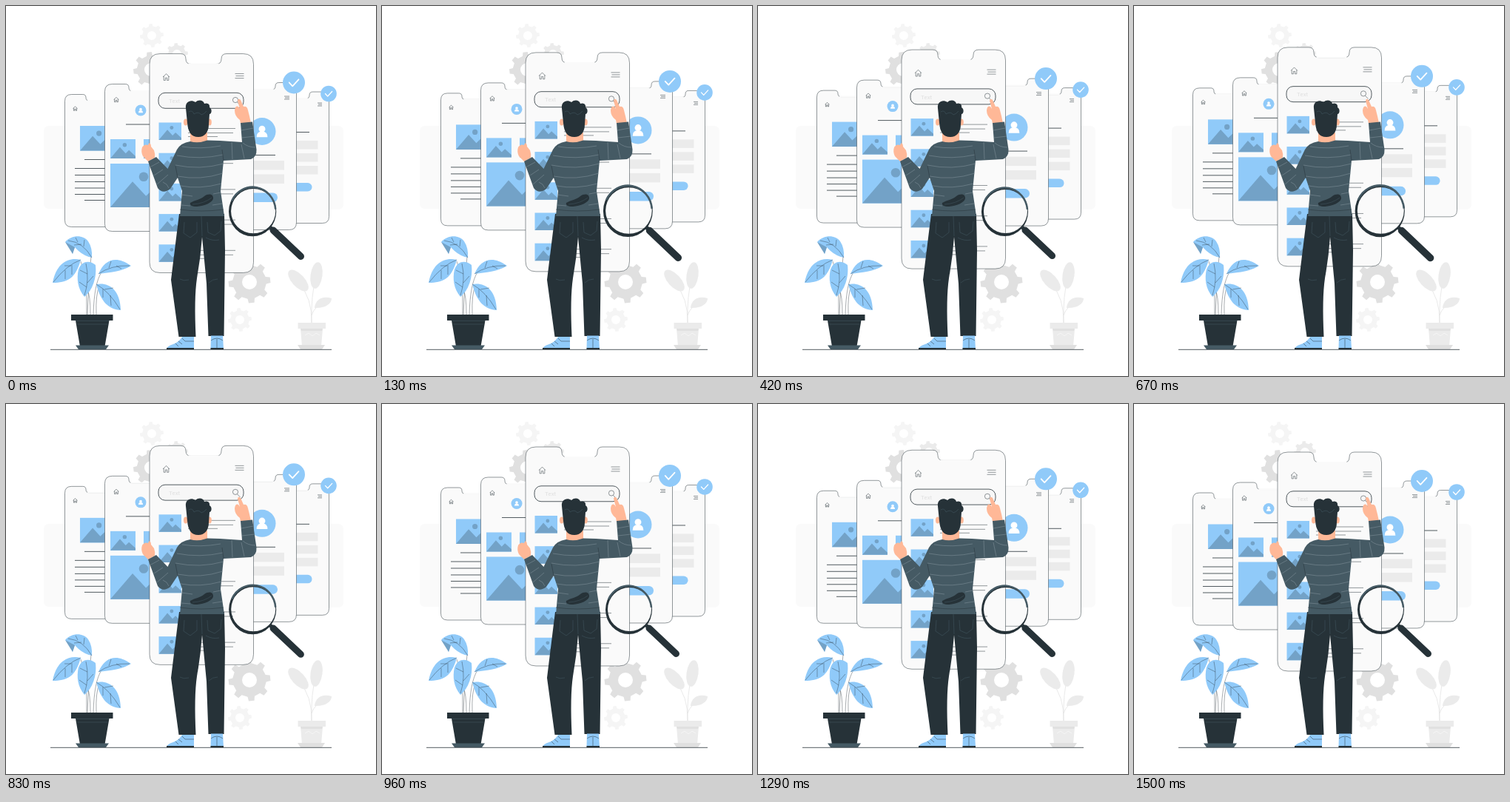
An HTML page for the animation above (1.54 s loop, 500 by 500 pixels).

```html
<!DOCTYPE html>
<html lang="en">
<head>
<meta charset="utf-8">
<style>
html, body { margin: 0; width: 100%; height: 100%; overflow: hidden; background: #fff; }
svg { display: block; width: 100%; height: 100%; }
.ink, .rule, .vein { fill: none; stroke: #263238; stroke-width: .5; }
.rule { stroke-width: .8; }
.vein { stroke-width: .4; }
.knit { fill: none; stroke: #8fa0a8; stroke-width: .45; }
.seam { fill: none; stroke: #455a64; stroke-width: .5; }
.tick { fill: none; stroke: #fff; stroke-linecap: round; stroke-linejoin: round; }
</style>
</head>
<body>
<svg viewBox="0 0 500 500">
  <g id="back"></g>
  <g id="phones"></g>
  <g id="lens">
    <path d="M357 299 399 338" stroke="#263238" stroke-width="5"/>
    <path d="M361 303 397.500 337.500" stroke="#263238" stroke-width="9" stroke-linecap="round"/>
    <path fill="#263238" fill-rule="evenodd" d="M302 278a31.500 33 0 1 0 63 0a31.500 33 0 1 0 -63 0ZM305 277.500a29.500 29.500 0 1 0 59 0a29.500 29.500 0 1 0 -59 0Z"/>
    <path d="M306 264A30.500 32 0 0 1 364 275" fill="none" stroke="#455a64" stroke-width="2.500"/>
  </g>
  <g id="man">
    <path d="M234 281H295L296 330 294.500 446H273.500L271 375 265 312Q263 340 258 368 254 395 256.500 447H233.500L223 370Z" fill="#263238"/>
    <path class="seam" d="M241 292 240 307 249 313 258 306 258 292M272 292 273 306 282 310 290 304 291 291M235 369Q240 372 247 370M274 374Q279 369 286 369M270 313Q279 318 288 316M264 284 265 311"/>
    <g fill="#90caf9">
      <path d="M238 447H254V463.500H217Q218 459 226 457 234 454 238 447Z"/>
      <path d="M277 445.500H293L294 463.500H276.500Z"/>
    </g>
    <path d="M217 462H254V464H217ZM276.500 462H294V464H276.500Z" fill="#263238"/>
    <path class="ink" d="M229 456 233 460M233 453 238 457M238 449 242 453H254M277 452Q285 446 293 452M285 450V462"/>
    <path d="M249 171H272V186Q260 189 249 184Z" fill="#ffb897"/>
    <g fill="#ffb897">
      <ellipse cx="242.800" cy="157" rx="2.800" ry="4.500"/>
      <ellipse cx="275" cy="157" rx="2.800" ry="4.500"/>
      <path d="M192 210 185 203Q182 197 184 191 187 186 192 188L193 185.500Q196 185 196 190L200 195Q202 200 201 205Z"/>
      <path d="M317 159 316 154Q309 149 309 141 310 134 314 136L316 139 313 128Q314 124 317 127L321 136Q326 135 327 141L329 149 331 158Z"/>
    </g>
    <path d="M243 138C242 129 250 126 256 130 260 126 267 127 268 132 273 130 276 134 275 137 279 139 278 146 275 146L274 160C274 171 268 177 260 177 250 177 246 170 245 158Z" fill="#263238"/>
    <path class="seam" d="M247 143Q252 140 254 146 260 142 264 147 268 146 271 142"/>
    <path d="M249 183Q236 185 231 194L218.500 220 203 204 192 210 205 246Q212 255 222 247L232 232 238 250 235 284H295L290 250 294 209 331 207Q339 204 338.500 194L333 156.500 317 158 319 184 289 182 272 181.500Q260 186 249 183Z" fill="#455a64"/>
    <path class="knit" d="M238 190Q262 194 290 189M231 202Q262 208 293 201M229 215Q262 222 294 213M232 230Q262 236 293 226M236 243Q262 248 291 240M237 255 252 257M280 254 290 252M237 269 249 270M279 269 292 267M196 217 207 211M200 229 212 221M204 241 219 228M220 246Q218 240 212 238M318 168 334 165M319 178 336 176M320 185Q327 191 337 191M305 184 306 207M318 187 322 206"/>
    <path class="ink" d="M235 275Q264 279 294 275M232 232 229 216M294 209 292 194"/>
    <path d="M249 266C256 262 262 262 268 257 274 253 280 254 280 260 279 266 268 270 258 271 251 271 248 269 249 266Z" fill="#263238"/>
    <path class="seam" d="M252 268Q268 267 278 259"/>
  </g>
  <g id="plant">
    <path class="vein" d="M110 417Q112 365 115 339M114 417Q114 390 110 385M118 417Q119 375 129 360M122 417Q121 390 126 378M109 417Q110 370 101 345"/>
    <g fill="#90caf9">
      <path d="M80 319C89 309 104 309 111 318Q117 327 116 340 106 338 98 331L93 326 90 335Q86 322 80 319Z"/>
      <path d="M101 343C86 339 68 346 63 374 82 374 94 369 101 343Z"/>
      <path d="M121 350C113 343 102 344 98 356 95 369 97 382 106 393 117 384 123 367 121 350Z"/>
      <path d="M125 362C133 343 148 336 169 351 156 359 141 360 125 362Z"/>
      <path d="M122 376C137 373 154 381 155 411 139 410 128 400 122 376Z"/>
    </g>
    <path d="M80 319 93 326 90 335Z" fill="#73a2c7"/>
    <path class="vein" d="M84 317Q104 319 116 340M97 319 94 313M105 325 106 316M102 322 92 323M101 343Q82 350 64 373M88 351 79 351M80 357 80 369M89 350 89 363M108 348Q113 370 106 391M110 362 100 357M110 374 118 365M109 380 99 373M125 362Q142 350 167 351M139 354 142 345M149 351 156 355M122 376Q140 386 154 410M133 383 145 381M141 391 142 405M131 382 131 394"/>
    <path d="M88 417H144.500V425H139.500L133.500 460H100L94 425H88Z" fill="#263238"/>
    <path class="seam" d="M94 425.500H139M96 430H137"/>
    <path d="M94 458.500H139L135 464H98Z" fill="#455a64"/>
  </g>
  <g id="palePlant">
    <path d="M413 428Q414 395 396 375M413 428Q412 390 419 366M413 418Q417 405 430 402" fill="none" stroke="#e0e0e0" stroke-width=".7"/>
    <g fill="#ebebeb">
      <ellipse cx="395" cy="371" rx="8.500" ry="18" transform="rotate(-43 395 371)"/>
      <ellipse cx="419.500" cy="364" rx="8" ry="18" transform="rotate(8 419.500 364)"/>
      <path d="M417 408C418 396 428 391 440 395 440 403 430 409 417 408Z"/>
      <path d="M394.500 428H432V436H428L426 460H400L398 436H394.500Z"/>
    </g>
    <path d="M398 436H428L427 439H399ZM394 458H431L427 464H398Z" fill="#e0e0e0"/>
    <path d="M404 445 409 442 414 446 419 442 424 445" fill="none" stroke="#f5f5f5"/>
  </g>
  <path class="rule" d="M60 464.300H440"/>
</svg>
<script>
const LOOP = 1540, STEPS = 37, RISE = 10;
const $ = id => document.getElementById(id);

const box = (x, y, w, h, fill, r = 0) =>
  `<rect x="${x}" y="${y}" width="${w}" height="${h}" rx="${r}" fill="${fill}"/>`;
const dot = (x, y, r, fill) => `<circle cx="${x}" cy="${y}" r="${r}" fill="${fill}"/>`;
const line = (d, style = 'ink') => `<path class="${style}" d="${d}"/>`;
const rule = (x, y, w, style = 'rule') => line(`M${x} ${y}h${w}`, style);

function gear(x, y, r, hole, fill, teeth = 8) {
  const inner = r * .8, pitch = 2 * Math.PI / teeth, pts = [];
  for (let i = 0; i < teeth; i++)
    for (const [k, q] of [[-.27, inner], [-.17, r], [.17, r], [.27, inner]]) {
      const a = (i + k) * pitch - .1;
      pts.push((x + q * Math.cos(a)).toFixed(1) + ' ' + (y + q * Math.sin(a)).toFixed(1));
    }
  return `<path fill="${fill}" fill-rule="evenodd" d="M${pts.join('L')}Z` +
    `M${x - hole} ${y}a${hole} ${hole} 0 1 0 ${2 * hole} 0a${hole} ${hole} 0 1 0 ${-2 * hole} 0Z"/>`;
}

// Screen outline with two ears either side of the notch
function phone(l, r, top, bottom, earL, earR, notch, c) {
  const e = (notch - top) / 2;
  return `<path fill="#fafafa" stroke="#263238" stroke-width=".5" d="M${l} ${top + c}q0 ${-c} ${c} ${-c}` +
    `H${earL - e}q${e} 0 ${e} ${e}t${e} ${e}H${earR - e}q${e} 0 ${e} ${-e}t${e} ${-e}` +
    `H${r - c}q${c} 0 ${c} ${c}V${bottom - c}q0 ${c} ${-c} ${c}H${l + c}q${-c} 0 ${-c} ${-c}Z"/>` +
    `<path d="M${earL + e / 2} ${notch}H${earR - e / 2}" stroke="#fafafa" stroke-width="2"/>`;
}

function picture(x, y, w, h) {
  const peaks = [[0, 1], [.38, .41], [.61, .74], [.74, .57], [1, .88], [1, 1]];
  return box(x, y, w, h, '#90caf9') + dot(x + w * .57, y + h * .3, w * .08, '#73a2c7') +
    `<polygon fill="#73a2c7" points="${peaks.map(([a, b]) => [x + a * w, y + b * h])}"/>`;
}

const house = (x, y, s) => line(`M${x - 4 * s} ${y}l${4 * s} ${-4 * s} ${4 * s} ${4 * s}` +
  `M${x - 3 * s} ${y - s}v${5 * s}h${2 * s}v${-3 * s}h${2 * s}v${3 * s}h${2 * s}v${-5 * s}`);
const menu = (x, y, w, gap) =>
  rule(x, y, w, 'ink') + rule(x + 1, y + gap, w - 1, 'ink') + rule(x, y + 2 * gap, w, 'ink');

const avatar = (x, y, r) => dot(x, y, r, '#90caf9') + dot(x, y - r * .18, r * .24, '#fff') +
  `<path fill="#fff" d="M${x - r * .4} ${y + r * .42}q0 ${-r * .42} ${r * .4} ${-r * .42}t${r * .4} ${r * .42}z"/>`;
const badge = (x, y, r) => dot(x, y, r, '#90caf9') +
  `<path class="tick" stroke-width="${r * .12}" d="M${x - r * .42} ${y}l${r * .3} ${r * .32} ${r * .55} ${-r * .6}"/>`;

$('back').innerHTML =
  box(51, 162, 100, 112, '#fafafa', 7) + box(356, 162, 100, 113, '#fafafa', 7) +
  gear(197, 40, 16, 6, '#f5f5f5') + gear(231, 65, 15, 6, '#ebebeb') +
  gear(196, 86, 24, 9, '#e0e0e0') + gear(329, 373, 28.5, 10, '#e0e0e0') +
  gear(316, 424, 16, 6, '#f5f5f5');

const article = phone(79.5, 200, 119.5, 298.5, 108, 165, 128, 9) + house(93.500, 138.500, .7) +
  picture(100, 162, 45, 33.5) + rule(106, 207.500, 30) +
  [219.5, 228.5, 237.5, 246, 254.5].map(y => rule(93, y, 45)).join('') + rule(106, 262.500, 30);

const gallery = phone(133.5, 260, 105.5, 304.5, 166, 230, 115, 10) + house(149, 126.500, .8) +
  avatar(182, 141, 7.5) + rule(162, 160, 40) +
  picture(141, 180, 34, 26) + picture(186, 180, 34, 26) + picture(141, 213, 79, 59);

const form = phone(330, 436.5, 116, 293.5, 366, 410, 125, 9) + menu(421, 131, 6, 2) +
  rule(385, 170.500, 25) + [182, 199, 216].map(y => box(380, y, 41.5, 11.5, '#ebebeb')).join('') +
  box(370, 239, 43.5, 11.5, '#90caf9', 5.7);

const profile = phone(270, 392.5, 103.5, 302.5, 300, 364, 113, 10) + menu(376, 122, 7, 2) +
  avatar(346, 169.500, 18.5) + rule(325, 201.500, 39) + box(320, 209, 56, 12.5, '#ebebeb') +
  box(320, 227.500, 56, 12.5, '#ebebeb') + box(310, 252.500, 57, 12.5, '#90caf9', 6.2);

const results = phone(194, 334.5, 64.5, 360.5, 243, 291, 78.5, 14) +
  house(216.500, 96, 1.1) + menu(309.500, 91.500, 12, 3) +
  `<rect class="rule" x="206" y="117.300" width="115" height="21" rx="9" style="fill:#f7f7f7"/>` +
  `<text x="220" y="131" font-family="Roboto, sans-serif" font-size="8" fill="#e0e0e0">Text</text>` +
  `<circle class="ink" cx="310" cy="127" r="3.600"/>` + line('M312.500 130l4 4') +
  [0, 1, 2, 3, 4].map(i => {
    const y = 157.5 + 41.2 * i;
    return picture(206.500, y, 30.5, 23.5) +
      rule(246, y + 8, 64, 'ink') + rule(246, y + 14, 61, 'ink') + rule(246, y + 19, 40, 'ink');
  }).join('');

$('phones').innerHTML = article + gallery + form + profile + results +
  badge(389, 103.500, 15) + badge(436, 118.500, 10.8);

// Double pulse of the magnifier: [ms, scale]
const pulse = [[0, 1.02], [170, 1.07], [400, 1], [630, 1.07], [930, 1], [LOOP, 1]];
function scaleAt(t) {
  const i = pulse.findIndex(k => k[0] > t);
  const [t0, a] = pulse[i - 1], [t1, b] = pulse[i];
  const p = (t - t0) / (t1 - t0);
  return a + (b - a) * p * p * (3 - 2 * p);
}

function draw(now) {
  const step = Math.floor((now % LOOP + 2) / LOOP * STEPS) % STEPS;
  const t = step * LOOP / STEPS;
  const phase = (t + 40) % LOOP / LOOP;
  const lift = RISE * (1 - Math.abs(1 - 2 * phase));
  $('phones').setAttribute('transform', `translate(0 ${.52 - lift})`);
  $('lens').setAttribute('transform', `translate(352 294) scale(${scaleAt(t)}) translate(-352 -294)`);
  requestAnimationFrame(() => draw(performance.now() - start));
}
const start = performance.now();
draw(0);
</script>
</body>
</html>
```
